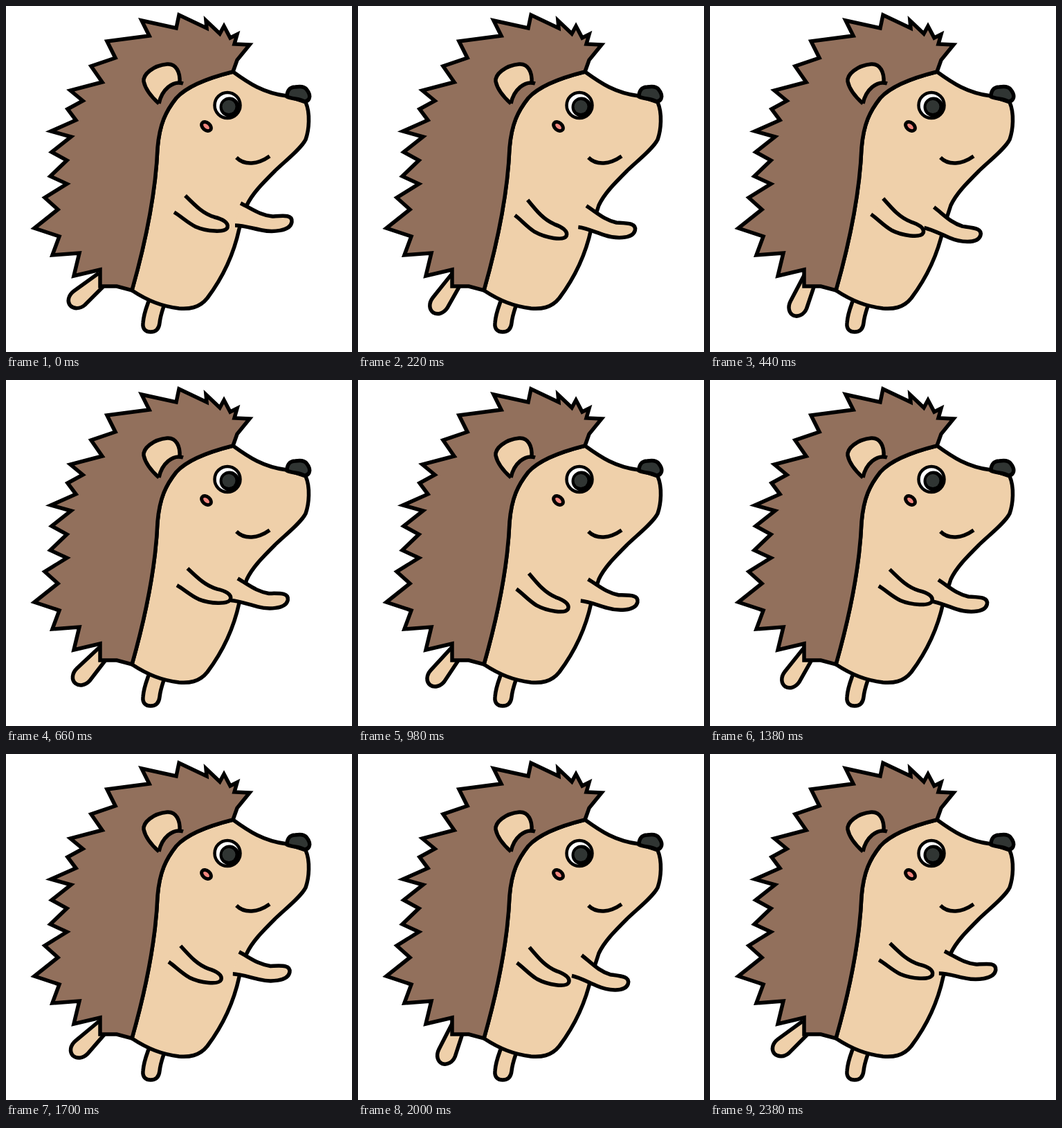
Animation, 500 px wide and 500 px high, one loop 2400 ms. Source, as an HTML page:

```html
<!DOCTYPE html>
<html lang="en">
<head>
<meta charset="utf-8">
<title>Running hedgehog</title>
<style>
  html, body { margin: 0; width: 100%; height: 100%; overflow: hidden; background: #fff; }
  svg { display: block; width: 100vw; height: 100vh; }
  .skin { fill: #efd0aa; }
  .fur { fill: #92705c; }
  .dark { fill: #303533; }
  .round { stroke-linejoin: round; stroke-linecap: round; }
</style>
</head>
<body>
<svg viewBox="0 0 500 500" stroke="#000" stroke-width="5.5" stroke-miterlimit="6">
  <path id="backLeg" class="skin" d="M134 386L98 412C90 418 88 427 93 433C98 438 107 438 114 432L142 404"/>
  <path class="skin" d="M206 427C202 438 199 445 198 458C197 468 203 471 209 471C216 471 221 467 222 458C223 448 226 440 229 431"/>

  <path class="skin round" d="M328 95C350 111 372 126 406 130L433 139C440 155 438 179 433 193
    C426 207 401 226 388 239C370 257 356 271 348 288L337 322C331 350 318 386 291 422
    C279 437 264 438 250 437C225 434 205 426 182 411C197 358 216 280 219 205
    C222 170 231 152 246 133C263 114 296 103 328 95Z"/>
  <path class="fur" d="M328 95L334 78 352 56 330 55 334 41 324 46 315 29 309 40 289 21 290 32
    250 13 246 32 196 21 207 43 146 51 158 75 123 87 139 110 93 122 111 137 89 149 101 165
    65 181 94 189 66 211 88 223 64 246 88 257 56 277 75 294 41 321 77 333 67 360 106 357
    98 390 136 381 136 405 160 405 182 411C197 358 216 280 219 205
    C222 170 231 152 246 133C263 114 296 103 328 95"/>

  <path class="skin" d="M221 141C212 133 202 123 199 109C198 99 212 86 233 84C246 83 252 96 251 111"/>
  <path class="fur" d="M221 141C225 121 241 107 256 112"/>

  <path class="dark round" d="M406 131C406 124 409 117 418 117C424 116 431 116 434 120C438 125 440 130 438 134C436 138 433 138 431 138C423 133 414 135 406 131Z"/>
  <circle cx="320" cy="143.5" r="18.5" fill="#fff" stroke-width="4.5"/>
  <circle cx="323" cy="146" r="14.5" stroke="none"/>
  <circle class="dark" cx="322" cy="145.5" r="9.5" stroke="none"/>
  <ellipse cx="289.5" cy="174" rx="7.8" ry="5.3" transform="rotate(40 289.5 174)" fill="#f4877f" stroke-width="5"/>
  <path fill="none" d="M333 219C345 231 364 229 381 217"/>

  <path id="farArm" class="skin" d="M339 285C357 294 367 302 385 304C401 303 414 301 413 312
    C411 326 384 327 370 324C355 321 342 317 331 317"/>
  <path id="nearArm" class="skin" d="M259 274C275 290 285 300 301 305C313 308 322 313 320 320
    C317 328 290 326 274 319C262 313 253 304 243 298"/>
</svg>
<script>
  const PERIOD = 800;
  const wave = phase => Math.cos(2 * Math.PI * phase);

  function rotate(id, angle, x, y) {
    document.getElementById(id).setAttribute('transform', `rotate(${angle} ${x} ${y})`);
  }

  function draw(now) {
    const phase = now / PERIOD;
    const swing = (1 - wave(phase)) / 2;
    rotate('backLeg', -27 * swing, 138, 380);
    rotate('farArm', 11.7 * swing, 303, 211);
    rotate('nearArm', 3.95 * (0.61 - wave(phase + 0.145)), 192, 142);
  }

  let start;
  function tick(now) {
    start ??= now;
    draw(now - start);
    requestAnimationFrame(tick);
  }
  draw(0);
  requestAnimationFrame(tick);
</script>
</body>
</html>
```
